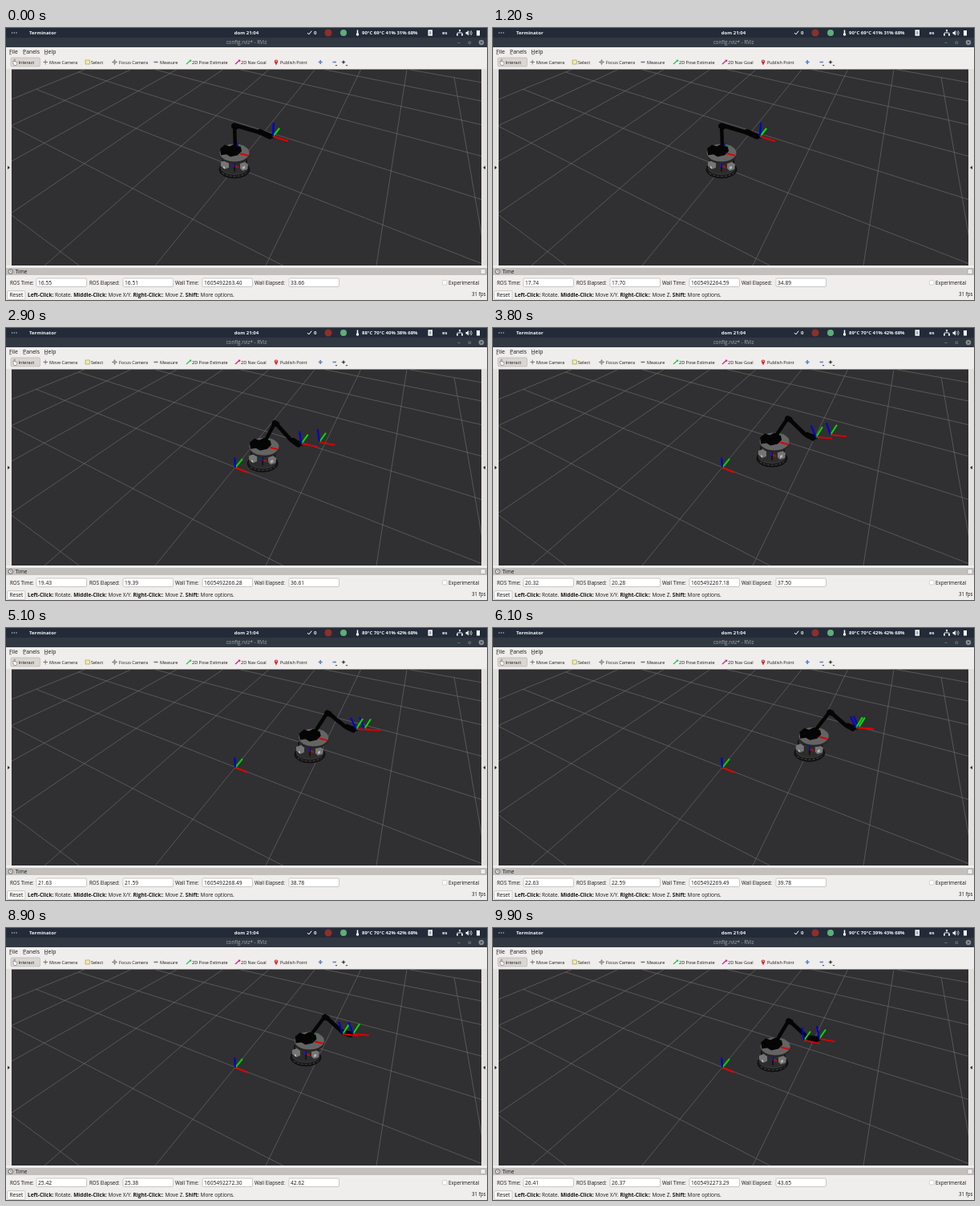
An HTML page that plays this animation: 600x339 px, repeating every 10 s.

```html
<!DOCTYPE html>
<html lang="en">
<head>
<meta charset="utf-8">
<title>config.rviz* - RViz</title>
<style>
  html, body { margin: 0; width: 100%; height: 100%; overflow: hidden; background: #f0eeec; }
  svg { display: block; width: 600px; height: 339px; }
  text { font: 6.2px "Open Sans", "Noto Sans", sans-serif; fill: #161616; white-space: pre; }
  .b { font-weight: 700; }
  .top text { fill: #f4f6f6; font-size: 6px; font-weight: 700; }
  .tools text { font-size: 5.5px; }
  .menu text { font-size: 6.9px; }
  .value { font-size: 6.7px; }
  .axes path { fill: none; stroke-width: 2; }
</style>
</head>
<body>
<svg viewBox="0 0 600 339" xmlns="http://www.w3.org/2000/svg">
  <defs><clipPath id="view"><rect x="7" y="51.500" width="586" height="244.500"/></clipPath></defs>
  <rect width="600" height="339" fill="#f0eeec"/>
  <path d="M0 51h7v245h-7zM593 51h7v245h-7z" fill="#e2e0dd"/>

  <g class="top">
    <rect width="600" height="12" fill="#232b38"/>
    <path d="M7 6h7" stroke="#fff" stroke-width="1.2" stroke-dasharray="1.200 1.500"/>
    <text x="29" y="8.3">Terminator</text>
    <text x="300" y="8.3" text-anchor="middle">dom 21:04</text>
    <path d="M376 6l1.800 2 3.400-4.300" fill="none" stroke="#fff"/>
    <text x="384" y="8.3">0</text>
    <circle cx="402" cy="6" r="4.500" fill="#8e2f2a"/>
    <circle cx="421" cy="6" r="4" fill="#5fae78"/>
    <path d="M438.500 2.500v4.500" stroke="#fff" stroke-width="1.500"/><circle cx="438.500" cy="8" r="1.700" fill="#fff"/>
    <text id="sensors" x="444" y="8.3"></text>
    <path d="M526.500 2.300h5.500v7.400h-5.500z" fill="#f4f6f6"/><path d="M528 5h2.500M528 7h2.500" stroke="#232b38" stroke-width=".8"/>
    <text x="544" y="8.3">es</text>
    <path d="M566 3v3M563 8V6h6v2" fill="none" stroke="#fff" stroke-width=".8"/>
    <path d="M565 2h2v2h-2zM562 7.500h2v2h-2zM568 7.500h2v2h-2zM573.500 5h1.500l2-2v6.500l-2-2h-1.500z" fill="#fff"/>
    <path d="M578.500 4.200q1.500 2 0 4M580 3.200q2.500 3 0 6" fill="none" stroke="#fff" stroke-width=".7"/>
    <path d="M587 3h4v6.500h-4z" fill="#fff"/>
  </g>

  <rect y="12" width="600" height="12" fill="#313841"/>
  <text x="300" y="20" text-anchor="middle" style="fill:#a6abb0;font-size:6.300px">config.rviz* - RViz</text>
  <path d="M563.500 18.500h3M577 17h2.500v2.500h-2.500z" fill="none" stroke="#7d848a" stroke-width=".7"/>
  <circle cx="593" cy="18" r="3.300" fill="#858b92"/>
  <path d="M591.700 16.700l2.600 2.600m0-2.600l-2.600 2.600" stroke="#313841" stroke-width=".7"/>

  <g class="menu">
    <text x="4" y="31.500">File</text><text x="21" y="31.500">Panels</text><text x="47.500" y="31.500">Help</text>
    <path d="M4 32.700h3M21.500 32.700h3M48 32.700h4" stroke="#222" stroke-width=".5"/>
  </g>

  <g class="tools">
    <rect x="6" y="37" width="36.500" height="11" rx="1.500" fill="#dad6d2" stroke="#b3afab" stroke-width=".6"/>
    <path d="M9 44v-3l1.200 1v-3h1v3l2.500.500v2.500l-1 1.500h-2.500z" fill="#fff" stroke="#555" stroke-width=".5"/>
    <path d="M46.500 42.500h5.500M49.200 39.700v5.600" stroke="#777" stroke-width="1"/>
    <rect x="99" y="40" width="5.500" height="5" fill="#f2ecac" stroke="#77722a" stroke-width=".7" stroke-dasharray="1 .5"/>
    <g fill="none" stroke="#666" stroke-width=".6"><circle cx="135.500" cy="42.500" r="2"/><path d="M132 42.500h7M135.500 39v7"/></g>
    <path d="M184.500 42.500h5" stroke="#778" stroke-width="1.600"/>
    <path d="M225 45l5-4.500" stroke="#26c84a" stroke-width="1.300"/><path d="M228.500 39.500l3 .3-.8 2.600z" fill="#26c84a"/>
    <path d="M286 45l5-4.500" stroke="#d2218c" stroke-width="1.300"/><path d="M289.500 39.500l3 .3-.8 2.600z" fill="#d2218c"/>
    <path d="M337 46.500l-2-4a2.200 2.200 0 1 1 4 0z" fill="#cc2b2b"/><circle cx="337" cy="41.300" r=".8" fill="#fff"/>
    <path d="M389.700 42.500h5M392.200 40v5" stroke="#5b86c6" stroke-width="1.600"/>
    <path d="M407.500 42.500h4.500" stroke="#5b86c6" stroke-width="1.600"/>
    <circle cx="421" cy="42.500" r="1.500" fill="#444"/><path d="M418.500 42.500h5M421 40v5" stroke="#444" stroke-width=".6"/>
    <path d="M410.500 46h3l-1.500 1.500zM423.500 46h3l-1.500 1.500z" fill="#444"/>
    <text x="15.500" y="44.600">Interact</text><text x="54" y="44.600">Move Camera</text>
    <text x="106" y="44.600">Select</text><text x="141" y="44.600">Focus Camera</text>
    <text x="192" y="44.600">Measure</text><text x="232" y="44.600">2D Pose Estimate</text>
    <text x="293" y="44.600">2D Nav Goal</text><text x="342" y="44.600">Publish Point</text>
  </g>

  <g clip-path="url(#view)">
    <rect x="7" y="51" width="586" height="245" fill="#302f31"/>
    <path id="grid" fill="none" stroke="#727272" stroke-width=".6"/>
    <g class="axes">
      <path stroke="#e00000" d="M286 174l15 6"/><path stroke="#00d000" d="M286 174l9 -11"/><path stroke="#0000d8" d="M286 174l-.8 -12.500"/>
    </g>
    <g id="base">
      <ellipse cy="1.500" rx="19" ry="10.500" fill="#191919" stroke="#0b0b0b"/>
      <ellipse cy="-.5" rx="16.500" ry="8" fill="#2c2c2c" stroke="#4a4a4a" stroke-width=".6"/>
      <path d="M-14 -14v11M15 -14v11M0 -8v12" stroke="#151515" stroke-width="2"/>
      <path d="M-17 -8l6 -2 4 3v6l-5 2-5-4zM7 -6l6-2 4 3-1 6-6 2-3-3z" fill="#757575"/>
      <path d="M-14 -3l2 1v2.500l-2-1zM10 -2l3-1v3l-3 1z" fill="#b4b4b4"/>
      <path d="M-15 6q15 8 30 0" fill="none" stroke="#666" stroke-width=".7" stroke-dasharray="2 3"/>
      <g class="axes"><path stroke="#1818c8" d="M-1 -2v-5"/><path stroke="#b01010" d="M1 -3l4 2"/></g>
    </g>
    <g id="plate">
      <ellipse cy="2.500" rx="18.500" ry="11" fill="#262626"/>
      <ellipse rx="18.500" ry="11" fill="#646464"/>
      <g class="axes"><path stroke="#008c14" d="M4 -4l4 -5"/><path stroke="#e00000" d="M7 1l10 2.500"/></g>
      <path d="M-18 -5l6-5 6 2 6-3 8 4 1 5-5 5-9 2-5-3-7 1z" fill="#050505"/>
      <path d="M4 -8v-5" stroke="#1616a8" stroke-width="2"/>
    </g>
    <g fill="none" stroke="#050505" stroke-linejoin="round" stroke-linecap="round">
      <path id="upper" stroke-width="4.500"/><path id="fore" stroke-width="5"/>
      <path id="joint" stroke-width="7"/><path id="wrist" stroke-width="7"/>
    </g>
    <g class="axes" id="goal"></g>
    <g class="axes" id="hand"></g>
  </g>
  <path d="M2 171.800l3 2.200-3 2.200zM598 171.800l-3 2.200 3 2.200z" fill="#333"/>

  <rect y="299" width="600" height="9" fill="#c3c0bd"/>
  <circle cx="5.800" cy="303.500" r="2.800" fill="#eee" stroke="#444" stroke-width=".8"/>
  <path d="M5.800 301.800v2h1.500" fill="none" stroke="#444" stroke-width=".6"/>
  <text x="11.500" y="306" style="font-size:6.500px">Time</text>
  <rect x="592" y="300.500" width="6" height="6" rx="1" fill="#eee" stroke="#999" stroke-width=".6"/>

  <g id="fields"></g>
  <rect x="544.500" y="314.500" width="5.500" height="5.500" rx="1" fill="#fff" stroke="#bbb" stroke-width=".6"/>
  <text x="552" y="319.600">Experimental</text>

  <rect x="1.500" y="327.500" width="22.500" height="11" rx="1.500" fill="#f8f7f6" stroke="#b5b1ad" stroke-width=".6"/>
  <text x="4.500" y="335.400" style="font-size:6.500px">Reset</text>
  <text x="27" y="335" style="font-size:6.500px"><tspan class="b">Left-Click:</tspan> Rotate. <tspan class="b">Middle-Click:</tspan> Move X/Y. <tspan class="b">Right-Click:</tspan>: Move Z. <tspan class="b">Shift:</tspan> More options.</text>
  <text x="598.500" y="334" text-anchor="end">31 fps</text>
</svg>
<script>
const $ = id => document.getElementById(id);
const LOOP = 10000, STEP = 100;

// time, base x y, elbow x y, hand x y, goal x y, forearm sag, tilt
const POSES = [
  [0, 285, 175, 285, 121, 333, 135, 333, 135, 0, 0],
  [1150, 285, 175, 285, 121, 333, 135, 333, 135, 0, 0],
  [2000, 296, 173, 304, 121, 341, 149, 358, 148, 6, .05],
  [3800, 348, 161, 368, 112, 403, 136, 421, 133, 6, .9],
  [5100, 379, 156, 401, 105, 437, 126, 447, 126, 5, 1],
  [6500, 397, 154, 423, 104, 455, 124, 457, 124, 5, 1],
  [7400, 392, 155, 418, 105, 450, 125, 449, 125, 5, 1],
  [8900, 374, 160, 398, 110, 433, 132, 420, 132, 6, .85],
  [9900, 349, 167, 369, 115, 407, 138, 388, 140, 7, .5]
];
// time, ROS clock, wall clock, wall elapsed
const CLOCKS = [
  [0, 16.55, 63.40, 33.66], [2000, 18.53, 65.38, 35.71], [3800, 20.32, 67.18, 37.50],
  [5100, 21.63, 68.49, 38.78], [7400, 23.92, 70.79, 41.09], [8900, 25.42, 72.30, 42.62],
  [9900, 26.41, 73.29, 43.65]
];
const SENSORS = [
  [0, "90°C 69°C 41% 31% 68%"], [1900, "88°C 70°C 40% 38% 68%"], [3700, "89°C 70°C 41% 42% 68%"],
  [6000, "89°C 70°C 42% 42% 68%"], [9700, "90°C 70°C 39% 43% 68%"]
];

function segment(keys, t) {
  let i = 0;
  while (i < keys.length - 2 && t >= keys[i + 1][0]) i++;
  return i;
}

function linear(keys, t) {
  const i = segment(keys, t), [a, b] = [keys[i], keys[i + 1]];
  const u = (t - a[0]) / (b[0] - a[0]);
  return a.slice(1).map((v, k) => v + (b[k + 1] - v) * u);
}

// Monotone cubic interpolation
function smooth(keys, t) {
  const i = segment(keys, t), a = keys[i], b = keys[i + 1], h = b[0] - a[0], u = (t - a[0]) / h;
  const slope = (j, c) => keys[j] && keys[j + 1]
    ? (keys[j + 1][c] - keys[j][c]) / (keys[j + 1][0] - keys[j][0]) : null;
  const tangent = (j, c) => {
    const p = slope(j - 1, c), q = slope(j, c);
    if (p === null) return q;
    if (q === null) return p;
    return p * q > 0 ? 2 * p * q / (p + q) : 0;
  };
  return a.slice(1).map((v, k) => {
    const c = k + 1, w = 1 - u;
    return v * w * w * (1 + 2 * u) + b[c] * u * u * (3 - 2 * u)
      + h * u * w * (w * tangent(i, c) - u * tangent(i + 1, c));
  });
}

function drawGrid() {
  const focal = 295.7, dist = 3.45, pitch = Math.PI / 4, yaw = .4974, near = .3;
  const shift = 14 * dist / focal;
  const camera = (x, y) => {
    const forward = y * Math.cos(yaw) - x * Math.sin(yaw);
    return [x * Math.cos(yaw) + y * Math.sin(yaw) - shift, forward * Math.sin(pitch), dist + forward * Math.cos(pitch)];
  };
  const clip = (p, q) => {
    if (p[2] >= near) return p;
    const u = (near - p[2]) / (q[2] - p[2]);
    return p.map((v, k) => v + (q[k] - v) * u);
  };
  const screen = ([x, y, z]) => `${(300 + focal * x / z).toFixed(1)} ${(173.5 - focal * y / z).toFixed(1)}`;
  const line = (p, q) => p[2] < near && q[2] < near ? "" : `M${screen(clip(p, q))}L${screen(clip(q, p))}`;
  let d = "";
  for (let i = -5; i <= 5; i++)
    d += line(camera(i, -5), camera(i, 5)) + line(camera(-5, i), camera(5, i));
  $("grid").setAttribute("d", d);
}

function buildFields() {
  const fields = [["ROS Time:", 5, 38], ["ROS Elapsed:", 104, 146], ["Wall Time:", 211, 245], ["Wall Elapsed:", 310, 353]];
  $("fields").innerHTML = fields.map(([label, x, box], i) => `
    <text x="${x}" y="319.6">${label}</text>
    <rect x="${box}" y="312" width="62.5" height="10.5" rx="1.5" fill="#fff" stroke="#b8b4b0" stroke-width=".7"/>
    <text id="field${i}" class="value" x="${box + 2}" y="319.6"></text>`).join("");
}

function axes(x, y, tilt) {
  const arm = (color, dx, dy) => `<path stroke="${color}" d="M${x} ${y}l${dx} ${dy}"/>`;
  return arm("#d80000", 19 + tilt, 6 - 5 * tilt) + arm("#00e000", 8, -10 - 3 * tilt)
    + arm("#0000d8", 1 - 8 * tilt, -17 + 3 * tilt);
}

function render(t) {
  const [bx, by, ex, ey, hx, hy, gx, gy, sag, tilt] = smooth(POSES, t);
  const px = bx + (bx - 285) * .05, py = by - 19.5;
  const wx = ex + (hx - ex) * .6, wy = ey + (hy - ey) * .6 + sag;
  const place = (id, x, y) => $(id).setAttribute("transform", `translate(${x} ${y})`);
  const path = (id, ...pts) => $(id).setAttribute("d", "M" + pts.join("L"));
  place("base", bx, by);
  place("plate", px, py);
  path("upper", `${px + 1} ${py - 6}`, `${ex} ${ey}`);
  path("joint", `${ex - .5} ${ey + 1}`, `${ex + 2} ${ey + 2}`);
  path("fore", `${ex} ${ey}`, `${wx} ${wy}`, `${hx} ${hy}`);
  path("wrist", `${wx + 3} ${wy + sag / 6}`, `${hx - 4} ${hy + sag / 6}`);
  $("hand").innerHTML = axes(hx, hy, tilt);
  $("goal").innerHTML = axes(gx, gy, tilt * .85);

  const [ros, wall, elapsed] = linear(CLOCKS, t);
  [ros, ros - .04, 1605492200 + wall, elapsed].forEach((v, i) => $("field" + i).textContent = v.toFixed(2));
  $("sensors").textContent = SENSORS.filter(s => s[0] <= t).pop()[1];
}

function tick() {
  render(Math.floor(performance.now() % LOOP / STEP) * STEP);
  requestAnimationFrame(tick);
}

drawGrid();
buildFields();
tick();
</script>
</body>
</html>
```
